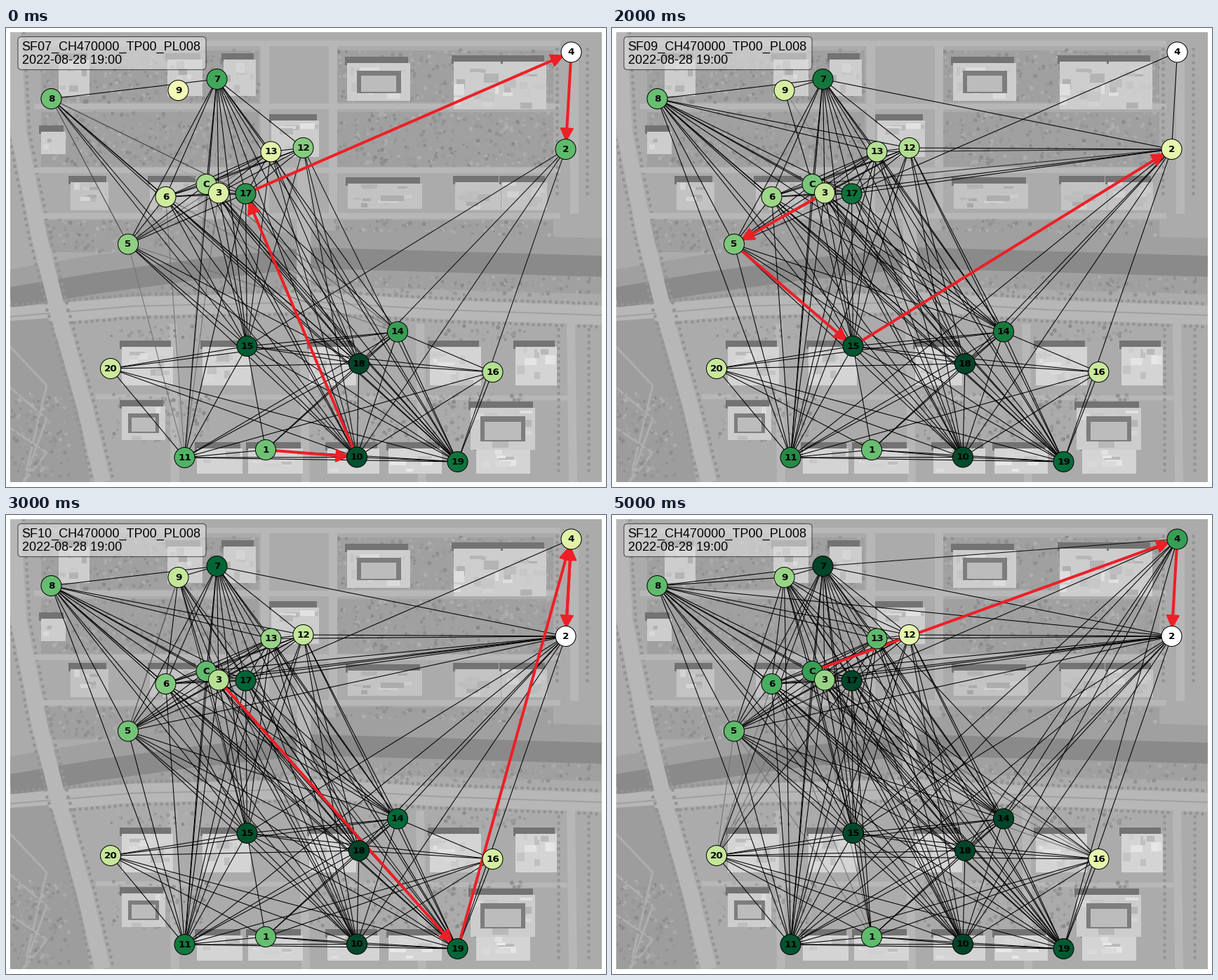
A matplotlib script for the animation above (6 s loop, 855 by 655 pixels).

```python
import random
from itertools import combinations
from math import hypot

import matplotlib.pyplot as plt
from matplotlib.animation import FuncAnimation
from matplotlib.collections import LineCollection
from matplotlib.patches import Circle, FancyBboxPatch, Polygon, Rectangle

W, H, DPI = 855, 655, 100
PX = 72 / DPI
LEFT, TOP, RIGHT, BOTTOM = 6, 6, 849, 648
STEPS = 6
RIVER_Y = 350
RED = "#ee1f26"
rng = random.Random(8)

# name: x, y, fill level at the first and the last step
NODES = {
    "C": (285.5, 223, 3.5, 6), "1": (370, 602, 4.7, 5),
    "2": (797.5, 173, 5, -3), "3": (303, 235.5, 2.2, 3.8),
    "4": (805.5, 34.5, -4, 6), "5": (174, 308.5, 4, 5),
    "6": (227.5, 241, 2.5, 5.5), "7": (300.5, 73, 5.7, 9.5),
    "8": (64.5, 101, 4.7, 5), "9": (245.5, 89, 1.3, 3.8),
    "10": (500, 612.5, 8.6, 9), "11": (254.5, 613, 5.3, 8.5),
    "12": (423.5, 171, 4.2, 1.8), "13": (377.5, 176.5, 2, 5),
    "14": (558, 433.5, 6, 9), "15": (343.5, 454, 8.2, 8.8),
    "16": (693.5, 491, 3.2, 1.8), "17": (341.5, 236.5, 6.4, 9),
    "18": (503, 479, 9, 9), "19": (643.5, 619, 7.4, 8.3),
    "20": (149, 486, 2.6, 2.8),
}

# how readily the members of each group form links
GROUPS = {"18 10 15 19": 4, "14 11": 3.7, "17 7": 2.4, "3 C 5 6": 2.2,
          "8 12 13 2": 1.95, "1 16 20": 1.8, "9": .8, "4": .6}
PULL = {name: p for names, p in GROUPS.items() for name in names.split()}

ROUTES = ["1>10 10>17 17>4 4>2", "9>C C>10 10>1", "3>5 5>15 15>2",
          "3>19 19>4 4>2 2>4", "9>C C>4 4>2", "C>4 4>2"]
HOPS = [[hop.split(">") for hop in route.split()] for route in ROUTES]

fig = plt.figure(figsize=(W / DPI, H / DPI), dpi=DPI, facecolor="white")
ax = fig.add_axes([LEFT / W, 1 - BOTTOM / H,
                   (RIGHT - LEFT) / W, (BOTTOM - TOP) / H])
ax.axis("off")


def grey(v):
    return str(v / 255)


def rect(x, y, w, h, tone):
    ax.add_patch(Rectangle((x, y), w, h, fc=grey(tone), lw=0, zorder=0))


def area(points, tone):
    ax.add_patch(Polygon(points, fc=grey(tone), lw=0, zorder=0))


def road(points, width, tone=183):
    ax.plot(*zip(*points), color=grey(tone), lw=width * PX, zorder=0,
            solid_joinstyle="round", solid_capstyle="butt")


def trees(x, y, w, h):
    n = int(w * h / 70)
    ax.scatter([x + w * rng.random() for _ in range(n)],
               [y + h * rng.random() for _ in range(n)],
               s=[rng.uniform(4, 20) for _ in range(n)],
               c=[grey(rng.randint(138, 176)) for _ in range(n)],
               lw=0, zorder=0)


def green(x, y, w, h):
    rect(x, y, w, h, 160)
    trees(x, y, w, h)


def tree_row(points, dx=0, dy=0, gap=9):
    for (x0, y0), (x1, y1) in zip(points, points[1:]):
        n = int(hypot(x1 - x0, y1 - y0) / gap)
        ax.scatter([x0 + dx + (x1 - x0) * k / n for k in range(n)],
                   [y0 + dy + (y1 - y0) * k / n for k in range(n)],
                   s=12, color=grey(148), lw=0, zorder=0)


def building(x, y, w, h, tone=205):
    rect(x - 3, y - 9, w, 12, 115)
    rect(x, y, w, h, tone)
    for _ in range(int(w * h / 350)):
        bw, bh = rng.uniform(5, w / 3), rng.uniform(3, h / 4)
        rect(x + rng.random() * (w - bw), y + rng.random() * (h - bh),
             bw, bh, tone + rng.randint(-30, 20))


def court(x, y, w, h):
    building(x, y, w, h)
    rect(x + w * .15, y + h * .2, w * .7, h * .6, 125)
    rect(x + w * .22, y + h * .34, w * .56, h * .42, 188)


def row(y, h, w, starts, tone=205):
    for x in starts:
        building(x, y, w * rng.uniform(.85, 1.1), h, tone)


def draw_map():
    rect(LEFT, TOP, RIGHT - LEFT, BOTTOM - TOP, 171)
    for x, w in ((50, 310), (470, 310)):
        for y, h in ((32, 74), (120, 78), (274, 46)):
            green(x, y, w, h)

    # river, banks and the avenue below it
    river = [(6, 385), (130, 364), (270, 345), (430, 328), (849, 340)]
    road(river, 80, 160)
    trees(170, 355, 670, 26)
    road(river, 30, 138)
    avenue = [(6, 412), (180, 397), (440, 391), (620, 402), (849, 410)]
    road(avenue, 27)
    road(avenue, 2, 160)
    for dy in (-17, 16):
        tree_row(avenue, dy=dy, gap=8)

    # park in the lower left corner
    area([(6, 418), (60, 414), (98, 500), (120, 648), (6, 648)], 157)
    for k in range(3):
        road([(6, 455 + 58 * k), (58, 510 + 48 * k), (25, 648)], 3, 174)
    trees(8, 520, 85, 120)

    west = [(10, 6), (18, 150), (48, 300), (78, 420), (112, 540), (138, 648)]
    road(west, 22)
    for dx in (-15, 15):
        tree_row(west, dx=dx)
    for y in (22, 112, 203, 268):
        road([(40, y), (790, y)], 8)
    for x in (369, 466, 810):
        road([(x, 20), (x, 265)], 12)
    road([(425, 190), (424, 395)], 20)
    for x in (238, 424, 590, 805):
        road([(x, 422), (x + 3, 648)], 12)
    road([(128, 526), (800, 528)], 7)
    for x in (785, 828):
        tree_row([(x, 30), (x, 245)])
        tree_row([(x + 2, 430), (x + 2, 640)])
    for x in (150, 435, 600):
        trees(x, 425, 140, 20)
        trees(x, 520, 140, 70)

    row(45, 52, 50, (75, 230, 310))
    row(48, 68, 68, (638, 708))
    row(132, 52, 62, (378,))
    row(148, 32, 34, (50,))
    row(220, 40, 62, (92, 205, 640, 706), 195)
    row(222, 36, 122, (487,), 195)
    row(455, 55, 68, (165, 280, 432, 604, 726), 212)
    row(600, 36, 72, (272, 345, 458, 545, 670), 212)
    court(486, 50, 90, 54)
    court(165, 540, 62, 48)
    court(662, 542, 92, 60)


def link_margin(a, b, step):
    """How far a pair stands above the linking threshold at a step."""
    (xa, ya), (xb, yb) = NODES[a][:2], NODES[b][:2]
    score = PULL[a] + PULL[b]
    if (ya < RIVER_Y) == (yb < RIVER_Y):
        score += 2.4 * (1 - hypot(xb - xa, yb - ya) / 900)
    return score - (5.85 - .38 * step)


def add_links(step):
    walked = {frozenset(hop) for hops in HOPS[:step] for hop in hops}
    links = []
    for a, b in combinations(NODES, 2):
        margin = 1 if {a, b} in walked else link_margin(a, b, step)
        if margin >= 0:
            tone = max(0, .85 - 8 * margin)
            links.append((tone, [NODES[a][:2], NODES[b][:2]]))
    links.sort(key=lambda link: -link[0])
    lines = LineCollection([seg for _, seg in links],
                           colors=[str(tone) for tone, _ in links],
                           linewidths=1.05 * PX, zorder=2)
    return [ax.add_collection(lines)]


def add_arrow(a, b):
    (x0, y0), (x1, y1) = NODES[a][:2], NODES[b][:2]
    d = hypot(x1 - x0, y1 - y0)
    ux, uy = (x1 - x0) / d, (y1 - y0) / d
    tx, ty = x1 - 12 * ux, y1 - 12 * uy
    bx, by = tx - 18 * ux, ty - 18 * uy
    wx, wy = -9 * uy, 9 * ux
    shaft, = ax.plot([x0 + 12 * ux, bx], [y0 + 12 * uy, by], color=RED,
                     lw=4 * PX, solid_capstyle="butt", zorder=3)
    head = ax.add_patch(Polygon(
        [(tx, ty), (bx + wx, by + wy), (bx - wx, by - wy)],
        fc=RED, ec=RED, lw=1, zorder=3))
    return [shaft, head]


def add_nodes(step):
    out = []
    for k, (name, (x, y, first, last)) in enumerate(NODES.items()):
        level = first + (last - first) * step / (STEPS - 1)
        fill = plt.cm.YlGn(min(level / 9, 1.0)) if level > .5 else "white"
        z = 4 + k / 100
        out.append(ax.add_patch(Circle((x, y), 14.5, fc=fill, ec="black",
                                       lw=PX, zorder=z)))
        out.append(ax.text(x, y, name, family="DejaVu Sans", size=9.7,
                           weight="bold", ha="center", va="center",
                           zorder=z))
    return out


def add_caption(step):
    box = FancyBboxPatch((17, 12.5), 268, 47,
                         boxstyle="round,pad=0,rounding_size=5",
                         fc=(.87, .87, .87, .6), ec=(0, 0, 0, .55),
                         lw=1.2 * PX, zorder=6)
    lines = f"SF{step + 7:02d}_CH470000_TP00_PL008", "2022-08-28 19:00"
    return [ax.add_patch(box)] + [
        ax.text(22.5, 32 + 18.5 * k, line, family="Liberation Sans",
                size=13, va="baseline", zorder=7)
        for k, line in enumerate(lines)]


live = []


def clear():
    while live:
        live.pop().remove()
    return []


def draw(step):
    clear()
    live.extend(add_links(step))
    for a, b in HOPS[step]:
        live.extend(add_arrow(a, b))
    live.extend(add_nodes(step))
    live.extend(add_caption(step))
    return live


draw_map()
ax.set_xlim(LEFT, RIGHT)
ax.set_ylim(BOTTOM, TOP)
anim = FuncAnimation(fig, draw, frames=STEPS, init_func=clear, interval=1000,
                     repeat=True, repeat_delay=0, blit=False)
plt.show()
```
